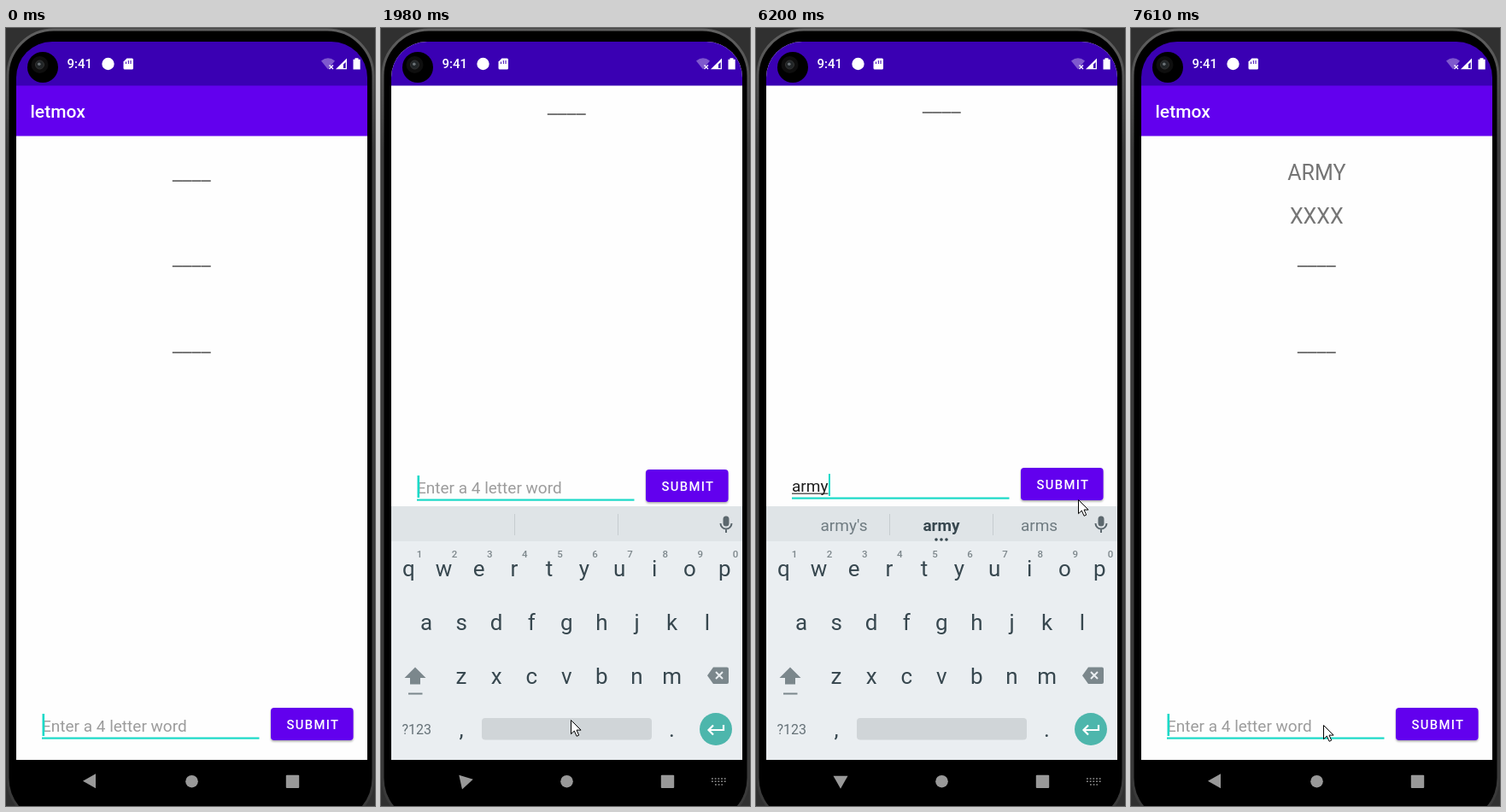
Write an HTML page that moves like this. It is 432 px wide and 911 px high and loops after 8000 ms.

```html
<!DOCTYPE html>
<html lang="en">
<head>
<meta charset="utf-8">
<title>Word game</title>
<style>
  html, body { margin: 0; width: 100%; height: 100%; overflow: hidden; background: #303030; }
  svg { display: block; width: 432px; height: 911px; font-family: Roboto, sans-serif; }
  .mid { text-anchor: middle; }
  .row { font-size: 25px; fill: #757575; }
  .field { font-size: 19px; }
  .key { font-size: 26px; fill: #37474f; }
  .digit { font-size: 11.5px; font-weight: 500; fill: #7d878c; }
  .word { font-size: 19px; fill: #6f7b81; }
  .best { font-weight: 700; fill: #37474f; }
</style>
</head>
<body>
<svg viewBox="0 0 432 911">
  <defs>
    <clipPath id="screen"><rect x="12" y="16" width="411" height="892" rx="42"/></clipPath>
    <filter id="shadow" x="-10%" y="-20%" width="120%" height="160%">
      <feDropShadow dx="0" dy="1.5" stdDeviation="1.2" flood-opacity=".35"/>
    </filter>
    <linearGradient id="rim" x2="0" y2="1">
      <stop stop-color="#606060"/>
      <stop offset=".15" stop-color="#3a3a3a"/>
    </linearGradient>
  </defs>

  <rect width="432" height="911" fill="#303030"/>
  <rect x="2" y="2" width="428" height="930" rx="54" stroke="url(#rim)" stroke-width="3"/>

  <g clip-path="url(#screen)">
    <rect width="432" height="911"/>
    <g id="app">
      <rect x="12" y="67" width="411" height="790" fill="#fefefe"/>
      <rect x="12" y="67" width="411" height="59.5" fill="#6200ee"/>
      <text x="28.5" y="105" font-size="21" font-weight="500" fill="#fff">letmox</text>
      <text id="guess" class="row mid" x="217.3" y="178"></text>
      <text id="result" class="row mid" x="217.3" y="228.5"></text>
      <text class="row mid" x="217.3" y="278">____</text>
      <text class="row mid" x="217.3" y="379">____</text>
      <text id="hint" class="field" x="42" y="824" fill="#9c9c9c">Enter a 4 letter word</text>
      <text id="typed" class="field" x="42" y="824" fill="#1d1d1d"></text>
      <rect id="composing" x="42" y="825.6" height="1.1" fill="#1d1d1d"/>
      <rect id="caret" y="803" height="26" fill="#1bdac8"/>
      <rect x="42" y="830.5" width="254.5" height="2.2" fill="#1bdac8"/>
      <rect x="310" y="796" width="96.6" height="38" rx="4" fill="#6200ee" filter="url(#shadow)"/>
      <rect id="ripple" x="310" y="796" width="96.6" height="38" rx="4" fill="#fff"/>
      <text x="328.5" y="821" font-size="14.8" font-weight="500" letter-spacing="1.35" fill="#fff">SUBMIT</text>
    </g>

    <g id="keyboard">
      <rect x="12" y="560" width="411" height="42" fill="#dfe4e7"/>
      <rect x="12" y="601" width="411" height="256" fill="#eaeef1"/>
      <rect x="12" y="857" width="411" height="60"/>
      <path d="M156.5 569V594M277.5 569V594" stroke="#c6ccd0"/>
      <g id="words">
        <text class="word mid" x="103" y="589"></text>
        <text class="word best mid" x="217" y="589"></text>
        <text class="word mid" x="331.5" y="589"></text>
        <path d="M211 599h12.1" stroke="#37474f" stroke-width="3.6" stroke-linecap="round" stroke-dasharray="0 6"/>
      </g>
      <g fill="none" stroke="#5c686e" stroke-width="2">
        <rect x="401.5" y="572.5" width="5" height="10" rx="2.5" fill="#5c686e"/>
        <path d="M397.5 580a6.5 6.5 0 0 0 13 0M404 586.5V591"/>
      </g>
      <g id="keys"></g>
      <path d="M40 748.5L52.5 761H46V768.5H34V761H27.5Z" fill="#7b878c"/>
      <path d="M32 779.5H48.5" stroke="#7b878c" stroke-width="1.8"/>
      <path d="M389 748.5H405Q407 748.5 407 750.5V766Q407 768 405 768H389L382 758.2Z" fill="#7b878c"/>
      <path d="M392 754L400 762M400 754L392 762" stroke="#eaeef1" stroke-width="2"/>
      <text x="24.5" y="827" font-size="16" fill="#657177">?123</text>
      <rect x="118" y="808" width="199" height="25.5" rx="4" fill="#d0d5d8"/>
      <circle cx="392" cy="821" r="19" fill="#4db6ac"/>
      <path d="M401 816V822H384M389 816.5L383.5 822L389 827.5" fill="none" stroke="#fff" stroke-width="2.2"/>
    </g>

    <rect x="12" y="16" width="411" height="51.5" fill="#3a00b3"/>
    <g fill="#fff">
      <text x="71.5" y="47" font-size="15" font-weight="500">9:41</text>
      <circle cx="119.5" cy="42" r="7.2"/>
      <path d="M141.5 35.5H147.5Q149 35.5 149 37V47Q149 48.5 147.5 48.5H139Q137.5 48.5 137.5 47V39.5Z"/>
      <path d="M140.5 39.5v2.5M143.3 38v4M146 38v4" stroke="#3a00b3"/>
      <path d="M369 38.5Q377 32 385 38.5L377 48.5Z" opacity=".35"/>
      <path d="M378.5 43.5l4.5 4.5M383 43.5l-4.5 4.5" stroke="#fff" stroke-width="1.3"/>
      <path d="M386 48.3L399 35.5V48.3Z"/>
      <path d="M395 42.5L397.7 40V47H395Z" fill="#3a00b3"/>
      <path d="M408.5 35.2H412.5V36.7H414.7V48.5H406.5V36.7H408.5Z"/>
    </g>
    <g fill="#fff" fill-opacity=".6">
      <path id="back" d="M-9 0L6-8.5V8.5Z"/>
      <circle cx="217.5" cy="882.2" r="7.3"/>
      <rect x="327.8" y="874.7" width="15.4" height="15.4" rx="1"/>
      <path id="switcher" d="M387 879H404M387 882.3H404M391 886H400" fill="none" stroke="#8f8f8f" stroke-width="1.6" stroke-dasharray="1.8 1.9"/>
    </g>
  </g>

  <circle cx="43" cy="46" r="18"/>
  <circle cx="39.5" cy="43" r="10" fill="#0e0e0e"/>
  <circle cx="39.5" cy="43" r="5" fill="#222628" stroke="#333"/>
  <circle cx="38.8" cy="42.3" r="1.8" fill="#6c7377"/>

  <path id="pointer" d="M0 0V16.2L3.8 12.6L6.6 18.8L9.2 17.6L6.5 11.6H11.6Z" fill="#fff" stroke="#000" stroke-linejoin="round"/>
</svg>
<script>
const LOOP = 8000;
const TICK = 131;          // motion advances in steps of this length
const PAN = 281;           // how far the keyboard pushes the app up
const BLINK = 515;
const WORD = "army";
const TAP = 1740, SUBMIT = 6710, RETAP = 7600;
const TYPING = [4080, 4660, 5420, 5780];
const SUGGEST_DELAY = 130;
const SUGGESTIONS = {
  a: ["and", "a", "an"],
  ar: ["art", "ar", "are"],
  arm: ["army", "arm", "arms"],
  army: ["army's", "army", "arms"]
};
const CARET_RESETS = [-235, TAP, ...TYPING, SUBMIT, RETAP];

// ease holds the ease-out power for x and for y, which bends the path.
const glides = [
  { start: 660, length: 650, from: [366, 866], to: [222, 810], ease: [4, 1] },
  { start: 2740, length: 300, from: [222, 810], to: [216, 810], ease: [1, 1] },
  { start: 5900, length: 520, from: [383, 664], to: [366, 547], ease: [.6, 4.5] },
  { start: 6900, length: 700, from: [366, 547], to: [225, 816], ease: [3.6, 6] }
];

const $ = id => document.getElementById(id);
const set = (id, attrs) => {
  for (const name in attrs) $(id).setAttribute(name, attrs[name]);
};
const show = (id, on) => set(id, { visibility: on ? "visible" : "hidden" });
const ramp = (t, start, length) => Math.min(1, Math.max(0, (t - start) / length));
const easeOut = (p, power = 2.3) => 1 - (1 - p) ** power;
const started = t => time => time <= t;

function buildKeys() {
  const label = (cls, x, y, char) => `<text class="${cls} mid" x="${x}" y="${y}">${char}</text>`;
  const line = (chars, x, y, cls = "key") =>
    [...chars].map((char, i) => label(cls, x + i * 41.1, y, char)).join("");
  $("keys").innerHTML =
    line("qwertyuiop", 32.5, 642) + line("1234567890", 45, 619.5, "digit") +
    line("asdfghjkl", 53, 705) + line("zxcvbnm", 94, 767.5) +
    label("key", 94, 829.5, ",") + label("key", 340.5, 829.5, ".");
}

function drawPanels(t) {
  const pan = Math.round(PAN * (easeOut(ramp(t, 1750, 250)) - easeOut(ramp(t, 6768, 248))));
  const lift = easeOut(ramp(t, 1750, 220)) - easeOut(ramp(t, 6768, 250));
  const turn = 270 * (ramp(t, 1785, 300) - ramp(t, 6707, 300));
  const press = ramp(t, 6560, 200) - ramp(t, 6820, 250);
  set("app", { transform: `translate(0 ${-pan})` });
  set("keyboard", { transform: `translate(0 ${Math.round(PAN * (1 - lift))})`, opacity: lift ** 2.2 });
  set("back", { transform: `translate(99 881.8) rotate(${turn})` });
  set("ripple", { opacity: .41 * press });
}

function drawField(t) {
  const count = time => TYPING.filter(started(time)).length;
  const typed = t < SUBMIT ? WORD.slice(0, count(t)) : "";
  const suggested = WORD.slice(0, count(t - SUGGEST_DELAY));
  $("typed").textContent = typed;
  show("hint", !typed);

  const width = typed ? $("typed").getComputedTextLength() : 0;
  const idle = t - CARET_RESETS.findLast(started(t));
  set("composing", { width: typed === suggested ? width : 0 });
  set("caret", { x: 42.5 + width, width: typed ? 2 : 2.6 });
  show("caret", Math.floor(idle / BLINK) % 2 === 0);

  show("words", suggested);
  const words = SUGGESTIONS[suggested] || [];
  document.querySelectorAll("#words text").forEach((el, i) => el.textContent = words[i] || "");
}

function drawPointer(t) {
  const { start, length, from, to, ease } = glides.findLast(glide => glide.start <= t) || glides[0];
  const p = ramp(t, start, length);
  const [x, y] = from.map((v, i) => Math.round(v + (to[i] - v) * easeOut(p, ease[i])) + .5);
  set("pointer", { transform: `translate(${x} ${y})` });
}

function draw(t) {
  const stepped = Math.floor((t - 6) / TICK) * TICK + 6;
  drawPanels(stepped);
  drawPointer(stepped);
  drawField(t);

  const typing = t >= TYPING[0] && stepped < glides[2].start;
  show("pointer", stepped >= glides[0].start && !typing);
  show("switcher", t >= TAP && t < SUBMIT);
  $("guess").textContent = t < SUBMIT ? "____" : WORD.toUpperCase();
  $("result").textContent = t < SUBMIT ? "" : "XXXX";
}

buildKeys();
const begin = performance.now();
function tick() {
  draw((performance.now() - begin) % LOOP);
  requestAnimationFrame(tick);
}
tick();
</script>
</body>
</html>
```
